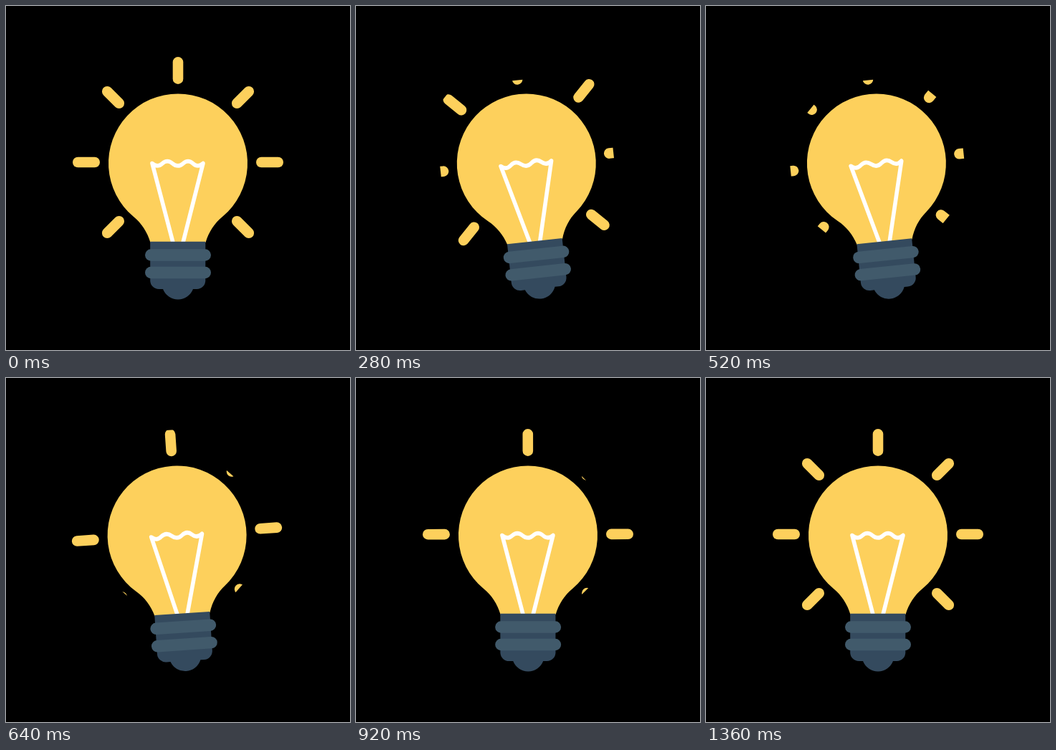
An HTML page with a canvas that plays this animation: 480x480 px, repeating every 1.48 s.

```html
<!DOCTYPE html>
<html>
<head>
<meta charset="utf-8">
<title>Light bulb</title>
<style>
html, body { margin: 0; height: 100%; overflow: hidden; background: #000; }
canvas { display: block; }
</style>
</head>
<body>
<canvas id="stage" width="480" height="480"></canvas>
<script>
const ctx = document.getElementById('stage').getContext('2d');
const LOOP = 1480, STEP = 40;
const YELLOW = '#fdd05c', BASE = '#344a5e', COLLAR = '#415a6b';

const glass = new Path2D('M201.5 330C197 315 189 303 178 294A97 97 0 1 1 302 294C291 303 283 315 278.5 330Z');
const filament = new Path2D('M233.5 332L204 219.5Q211 226 218 219.8T232.5 219.8T247 219.8T261 219.8T275 219.5L246.5 332');
const base = new Path2D('M201.2 328.7H278.3V383A12 12 0 0 1 266 395H261A22.5 22.5 0 0 1 219 395H213.5A12 12 0 0 1 201.2 383Z');

// Angle in degrees and how far the wipe of each ray lags behind
const straightRays = [[-90, 0], [180, 5], [0, 7]];
const diagonalRays = [[-135, 0.7], [135, 3.3], [-45, 5.8], [45, 8]];

const rad = deg => deg * Math.PI / 180;
const ease = p => (1 - Math.cos(Math.PI * Math.min(1, Math.max(0, p)))) / 2;
// Rises from 0 to 1 at the peak, then falls back to 0 at the end
const swing = (n, peak, end) => n < peak ? ease(n / peak) : ease((end - n) / (end - peak));

function pill(x, y, w, h, color) {
  ctx.fillStyle = color;
  ctx.beginPath();
  ctx.roundRect(x, y, w, h, h / 2);
  ctx.fill();
}

function drawRays(rays, reach) {
  for (const [angle, lag] of rays) {
    ctx.save();
    ctx.translate(240, 218);
    ctx.rotate(rad(angle));
    ctx.beginPath();
    ctx.rect(100, -10, Math.max(0, 16.3 + reach + lag), 20);
    ctx.clip();
    pill(109, -7.3, 38, 14.6, YELLOW);
    ctx.restore();
  }
}

function drawBulb() {
  ctx.fillStyle = YELLOW;
  ctx.fill(glass);
  ctx.strokeStyle = '#fff';
  ctx.lineWidth = 5.6;
  ctx.lineJoin = 'round';
  ctx.stroke(filament);
  ctx.fillStyle = BASE;
  ctx.fill(base);
  pill(194, 339.3, 92, 16.4, COLLAR);
  pill(194, 363.8, 92, 16.4, COLLAR);
}

function draw(n) {
  ctx.fillStyle = '#000';
  ctx.fillRect(0, 0, 480, 480);
  ctx.save();
  ctx.translate(240, 240);
  ctx.rotate(rad(-7 * swing(n, 9, 24)));
  ctx.translate(-240, -240);
  drawRays(straightRays, 53 - 68 * swing(n, 10, 20));
  drawRays(diagonalRays, 45 - 60 * swing(n, 20, 40));
  drawBulb();
  ctx.restore();
}

function tick() {
  const n = Math.floor(performance.now() % LOOP / STEP);
  draw(Math.min(n, 34));
  requestAnimationFrame(tick);
}
tick();
</script>
</body>
</html>
```
